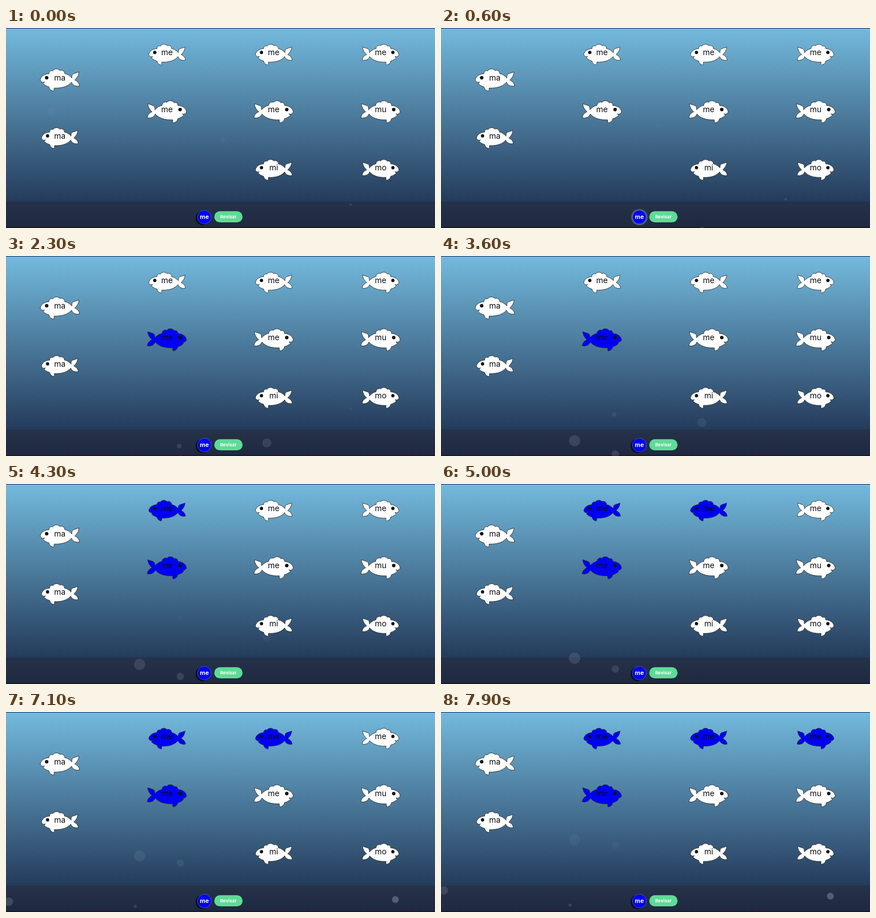
Write an HTML page that moves like this. It is 758 px wide and 354 px high and loops after 8 s.

```html
<!DOCTYPE html>
<html lang="es">
<head>
<meta charset="utf-8">
<title>Peces y sílabas</title>
<style>
  html, body { margin: 0; width: 100%; height: 100%; overflow: hidden; background: #182848; }
  svg { display: block; width: 100vw; height: 100vh; }
  text { font-family: Inter, "Open Sans", sans-serif; text-anchor: middle; }
  .skin { stroke: #222; stroke-width: .85; stroke-linejoin: round; }
  .label { font-size: 14px; fill: #0a0a0c; }
  .bold { font-weight: 700; fill: #fff; }
</style>
</head>
<body>
<svg id="stage" viewBox="0 0 758 354" preserveAspectRatio="none">
  <defs>
    <linearGradient id="sea" x1="0" y1="0" x2="0" y2="1">
      <stop offset="0" stop-color="#73badd"/>
      <stop offset="1" stop-color="#182848"/>
    </linearGradient>
    <linearGradient id="bar" x1="0" y1="0" x2="0" y2="1">
      <stop offset="0" stop-color="#263249"/>
      <stop offset="1" stop-color="#1e2940"/>
    </linearGradient>
    <filter id="soft" x="-40%" y="-40%" width="180%" height="180%">
      <feGaussianBlur stdDeviation="1.3"/>
    </filter>
    <path id="fish" d="M.6 20.5C.8 14.5 7 9.3 16 8.8C15.6 4.8 19 2.6 22.5 4
      C24.5-.4 33-.6 35 3.2C39 1.5 43.8 4 43.8 8.8C48.5 9.4 53 12.8 56.5 16.5
      C56 12.5 57 9.5 60.5 8.6C64 7.5 66.5 6.6 69 5.8C68.5 11 66.5 15.5 61.5 20
      C66 22 69.5 25.5 69.9 30.5C65 32 57.5 30 55.8 23.8
      C50 31 40 34.8 25 34.3C25 37 25 39 24 39.7
      C20 39 17 37 16 32.3C11.5 31 8 29 5.6 26.2L8 23.4C5 25 2 23.8 .6 20.5Z"/>
  </defs>

  <rect width="758" height="354" fill="url(#sea)"/>
  <rect y="307" width="758" height="47" fill="url(#bar)"/>
  <rect y="352" width="758" height="2" fill="#1b1738"/>
  <rect width="758" height="1" fill="#1c2a72"/>

  <g id="bubbles"></g>
  <g id="school"></g>

  <circle id="shade" cx="347.5" cy="336.3" r="12.6" fill="#0b0f20"/>
  <circle id="glow" cx="350.5" cy="334.7" r="13.8" fill="#8fa3a8" filter="url(#soft)"/>
  <circle cx="350.5" cy="334.7" r="12.1" fill="#0000f5" stroke="#5f76a8" stroke-width=".7"/>
  <text class="bold" x="350.5" y="338.4" font-size="10.5">me</text>
  <rect x="368" y="324.3" width="50" height="19.8" rx="9.9" fill="#5edb97"/>
  <text class="bold" x="393" y="337" font-size="7.7" letter-spacing=".15">Revisar</text>
</svg>

<script>
const LOOP = 8;
const FADE = 0.18;
const SMALL = 0.935;
const make = (name, attrs, parent) => {
  const el = document.createElementNS("http://www.w3.org/2000/svg", name);
  for (const key in attrs) el.setAttribute(key, attrs[key]);
  return parent.appendChild(el);
};
const byId = id => document.getElementById(id);
const clamp = v => Math.min(1, Math.max(0, v));

// centre x, top y, label, scale, faces right, time it is painted blue
const fish = [
  [95, 72, "ma", 1, false],
  [95, 176, "ma", SMALL, false],
  [284.5, 28.3, "me", SMALL, false, 3.62],
  [284.5, 128.3, "me", 1, true, 2.12],
  [473, 28.3, "me", SMALL, false, 4.82],
  [473, 128.3, "me", 1, true],
  [473, 232.3, "mi", SMALL, false],
  [662, 28.3, "me", SMALL, true, 7.3],
  [662, 128.3, "mu", 1, true],
  [662, 232.3, "mo", SMALL, true]
].map(([x, y, word, size, right, paint]) => {
  const flip = right ? -size : size;
  const g = make("g", { transform: `translate(${x} ${y}) scale(${flip} ${size}) translate(-35 0)` }, byId("school"));
  const skin = make("use", { href: "#fish", class: "skin", fill: "#fff" }, g);
  make("circle", { cx: 11.9, cy: 16, r: 3.1, fill: "#111" }, g);
  const label = make("text", { class: "label", x: x, y: y + 15.6 * size + 5.4 }, byId("school"));
  label.textContent = word;
  return { skin, paint };
});

// x, start y, acceleration, birth, life, radius, opacity
const bubbles = [
  [80, 243, 3.5, -5.2, 6.2, 7, .08],
  [383, 300, 3.5, -5.4, 6.4, 4.5, .1],
  [609, 350, 1.5, -5, 8.5, 2.3, .13],
  [461, 369, 3.5, -1, 5.8, 8, .15],
  [306, 359, 10, .8, 3.7, 4, .14],
  [308, 360, 3.5, 1.95, 6.6, 6.5, .14],
  [236, 332, 3.5, 2.4, 6.4, 10, .13],
  [5, 371, 3.5, 3.93, 6, 7.5, .19],
  [688, 334.7, 2.7, 6.1, 6, 6, .27],
  [228, 344, 3.5, 7.1, 6, 2.8, .13]
].map(([x, y, pull, birth, life, r, alpha]) => ({
  y, pull, birth, life, alpha,
  dot: make("circle", { cx: x, r: r, fill: "#dfe8f2" }, byId("bubbles"))
}));

function draw(t) {
  for (const { skin, paint } of fish) {
    if (paint === undefined) continue;
    const k = clamp((t - paint) / FADE);
    const white = Math.round(255 * (1 - k));
    skin.setAttribute("fill", `rgb(${white},${white},${Math.round(255 - 7 * k)})`);
  }
  for (const b of bubbles) {
    const age = t - b.birth;
    const alive = age >= 0 && age < b.life;
    b.dot.setAttribute("cy", b.y - b.pull * age * age);
    b.dot.setAttribute("opacity", alive ? b.alpha * (1 - (age / b.life) ** 3) : 0);
  }
  const lit = t >= .3 && t < 1.5;
  byId("glow").setAttribute("opacity", lit ? .65 : 0);
  byId("shade").setAttribute("opacity", lit ? 0 : 1);
}

const start = performance.now();
function tick() {
  draw(((performance.now() - start) / 1000) % LOOP);
  requestAnimationFrame(tick);
}
tick();
</script>
</body>
</html>
```
